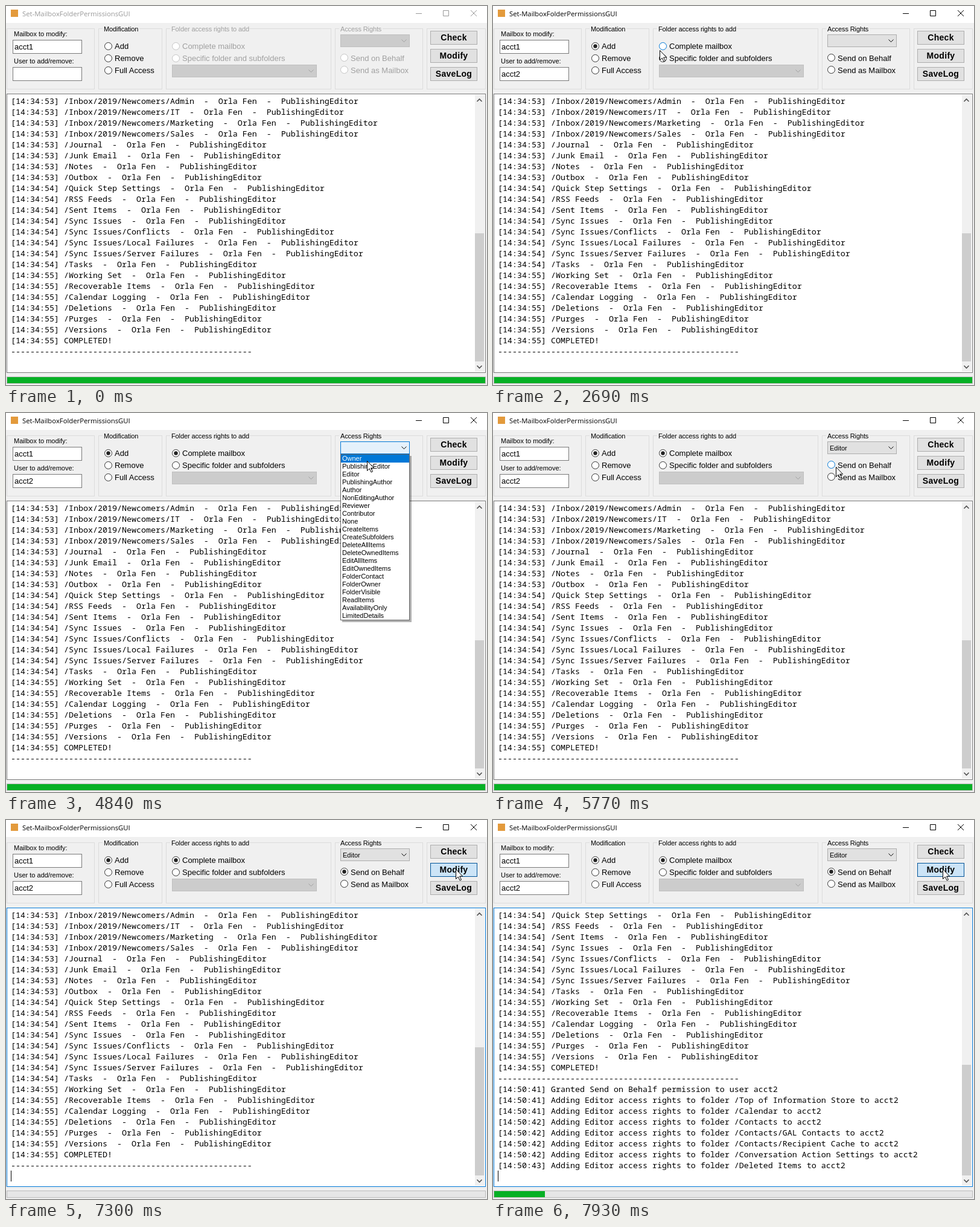
Write an HTML page that moves like this. It is 797 px wide and 627 px high and loops after 8000 ms.

```html
<!DOCTYPE html>
<html lang="en">
<head>
<meta charset="utf-8">
<title>Mailbox permissions</title>
<style>
html, body { margin: 0; width: 100%; height: 100%; overflow: hidden; background: #f0f0f0; }
svg { display: block; width: 797px; height: 627px; }
text { font: 13px "Liberation Sans", Arial, sans-serif; white-space: pre; fill: currentColor; }
.small { font-size: 11px; }
.head { font-size: 11px; letter-spacing: -.11px; }
.title { font: 11.3px "Open Sans", sans-serif; }
.bold { font-size: 14px; font-weight: bold; letter-spacing: .3px; }
.log text { font: 500 13.333px "Noto Sans Mono", monospace; }
.group { fill: none; stroke: #dcdcdc; }
.line { fill: none; stroke: currentColor; }
.box { fill: #fff; stroke: #7a7a7a; }
.box.hover { stroke: #171717; }
.box.focus { stroke: #0078d7; }
.button, .combo { fill: #e1e1e1; stroke: #adadad; }
.off { color: #a0a0a0; }
.off .combo { fill: #ccc; stroke: #bfbfbf; }
.ring { fill: #fff; stroke: #333; }
.off .ring { stroke: #c4c4c4; }
.hover .ring { stroke: #0078d7; }
.combo.hover, .button.hover { fill: #e5f1fb; stroke: #0078d7; }
.button.down { fill: #cce4f7; stroke: #005499; }
</style>
</head>
<body>
<svg id="stage" viewBox="0 0 797 627"></svg>
<script>
const STEP = 77, LOOP = 8000;
const stage = document.getElementById('stage');
const USER = 'acct2', PERSON = 'Orla Fen';

const rect = (x, y, w, h, attrs) => `<rect x="${x}" y="${y}" width="${w}" height="${h}" ${attrs}/>`;
const frame = (x, y, w, h, attrs) => rect(x + .5, y + .5, w - 1, h - 1, attrs);
const text = (x, y, str, attrs = '') => `<text x="${x}" y="${y}" xml:space="preserve" ${attrs}>${str}</text>`;
const path = (d, attrs) => `<path d="${d}" ${attrs}/>`;
const chevron = (x, y, dir = 1) => path(`M${x - 4} ${y - 2 * dir}l4 ${4 * dir}l4 ${-4 * dir}`, 'class="line"');

const radio = (id, x, y, label, baseline = y + 4.5) => `<g id="${id}">
  <circle class="ring" cx="${x}" cy="${y}" r="6"/>
  <circle id="${id}Dot" cx="${x}" cy="${y}" r="3.2" fill="#222" visibility="hidden"/>
  ${text(x + 10.5, baseline, label)}</g>`;

const group = (x, w, title = '', gap = 0) => frame(x, 37, w, 101, 'class="group"') +
  (title && rect(x + 7, 36, gap, 3, 'fill="#f0f0f0"') + text(x + 9, 42, title, 'class="head"'));

const button = (id, y, label) => frame(703, y, 78, 23, `id="${id}" class="button"`) +
  text(742, y + 16, label, 'class="bold" text-anchor="middle"');

// Log contents
const stamp = (time, str) => `[${time}] ${str}`;
const granted = (time, names) => names.map(n => stamp(time, `/${n}  -  ${PERSON}  -  PublishingEditor`));
const adding = (time, names) => names.map(n => stamp(time, `Adding Editor access rights to folder /${n} to ${USER}`));
const log = [
  ...granted('14:34:53', ['Inbox/2019/Newcomers/Admin', 'Inbox/2019/Newcomers/IT', 'Inbox/2019/Newcomers/Marketing',
    'Inbox/2019/Newcomers/Sales', 'Journal', 'Junk Email', 'Notes', 'Outbox']),
  ...granted('14:34:54', ['Quick Step Settings', 'RSS Feeds', 'Sent Items', 'Sync Issues', 'Sync Issues/Conflicts',
    'Sync Issues/Local Failures', 'Sync Issues/Server Failures', 'Tasks']),
  ...granted('14:34:55', ['Working Set', 'Recoverable Items', 'Calendar Logging', 'Deletions', 'Purges', 'Versions']),
  stamp('14:34:55', 'COMPLETED!'),
  '-'.repeat(50),
  stamp('14:50:41', `Granted Send on Behalf permission to user ${USER}`),
  ...adding('14:50:41', ['Top of Information Store', 'Calendar']),
  ...adding('14:50:42', ['Contacts', 'Contacts/GAL Contacts', 'Contacts/Recipient Cache', 'Conversation Action Settings']),
  ...adding('14:50:43', ['Deleted Items'])
];
const ROWS = 24;

const rights = ['Owner', 'PublishingEditor', 'Editor', 'PublishingAuthor', 'Author', 'NonEditingAuthor', 'Reviewer',
  'Contributor', 'None', 'CreateItems', 'CreateSubfolders', 'DeleteAllItems', 'DeleteOwnedItems', 'EditAllItems',
  'EditOwnedItems', 'FolderContact', 'FolderOwner', 'FolderVisible', 'ReadItems', 'AvailabilityOnly', 'LimitedDetails'];

stage.innerHTML = `
  ${rect(0, 0, 797, 627, 'fill="#f0f0f0"')}
  ${rect(0, 0, 797, 28, 'fill="#fff"')}
  ${rect(8, 6, 12, 12, 'fill="#e39a3c"')}
  <g id="caption">
    ${text(27, 17, 'Set-MailboxFolderPermissionsGUI', 'class="title"')}
    ${path('M679 12.5h10M724.5 7.5h9v9h-9zM770 7l10 10M780 7l-10 10', 'class="line"')}
  </g>
  ${group(1, 146)}
  ${text(13, 50, 'Mailbox to modify:', 'class="small"')}
  ${frame(11, 56, 115, 23, 'class="box"')}
  ${text(14, 72, 'acct1')}
  ${text(13, 95, 'User to add/remove:', 'class="small"')}
  ${frame(11, 101, 115, 23, 'id="field" class="box"')}
  ${text(14, 117, '', 'id="typed"')}
  ${rect(14, 105, 1, 15, 'id="caret"')}
  ${group(153, 106, 'Modification', 61)}
  ${radio('add', 169.5, 66.5, 'Add')}
  ${radio('remove', 169.5, 86.5, 'Remove')}
  ${radio('full', 169.5, 106.5, 'Full Access')}
  <g id="folders">
    ${group(265, 274, 'Folder access rights to add', 131)}
    ${radio('complete', 281.5, 66.5, 'Complete mailbox')}
    ${radio('specific', 281.5, 86.5, 'Specific folder and subfolders')}
    <g class="off">${frame(275, 97, 240, 21, 'class="combo"')}${chevron(505.5, 107.5)}</g>
  </g>
  <g id="access">
    ${group(545, 146, 'Access Rights', 72)}
    ${frame(554, 47, 115, 21, 'id="combo" class="combo"')}
    ${text(558, 62, 'Editor', 'id="chosen" class="small"')}
    ${chevron(659.5, 57.5)}
    ${radio('behalf', 560.5, 85.5, 'Send on Behalf', 91)}
    ${radio('asMailbox', 560.5, 105.5, 'Send as Mailbox', 111)}
  </g>
  ${group(697, 98)}
  ${button('check', 41, 'Check')}
  ${button('modify', 71, 'Modify')}
  ${button('save', 101, 'SaveLog')}
  ${frame(1, 145, 794, 462, 'id="logBox" class="box"')}
  ${rect(777, 147, 16, 458, 'fill="#f0f0f0"')}
  <g color="#505050" stroke-width="1.6">${chevron(784.5, 156, -1)}${chevron(784.5, 597)}</g>
  ${rect(777, 376, 15, 212, 'id="thumb" fill="#cdcdcd"')}
  <g class="log" id="rows">${Array.from({ length: ROWS }, (_, i) => text(8, 162 + 18 * i, '')).join('')}</g>
  ${rect(8, 580, 1, 18, 'id="logCaret"')}
  ${frame(1, 613, 794, 12, 'fill="#e6e6e6" stroke="#bcbcbc"')}
  ${rect(2, 614, 792, 10, 'id="progress" fill="#06b025"')}
  <g id="list">
    ${rect(557, 71, 115, 275, 'fill="#000" opacity=".3"')}
    ${frame(554, 68, 115, 275, 'fill="#fff" stroke="#646464"')}
    ${rect(555, 69, 113, 13, 'id="mark" fill="#0078d7"')}
    ${rights.map((r, i) => text(557, 79 + 13 * i, r, 'class="small"')).join('')}
  </g>
  <g id="cursor">
    ${path('M.5 .5v16l3.7-3.5 2.9 6 2.4-1.1-2.9-5.8h5z', 'id="arrow" fill="#fff" stroke="#000"')}
    ${path('M-3 -8.5h2.5l.5 .5l.5-.5h2.5M0 -8v16M-3 8.5h2.5l.5-.5l.5 .5h2.5', 'id="beam" class="line"')}
  </g>`;

const el = {};
stage.querySelectorAll('[id]').forEach(n => el[n.id] = n);
const rows = [...el.rows.children];
const items = [...el.list.querySelectorAll('text')];
const show = (node, on) => node.setAttribute('visibility', on ? 'visible' : 'hidden');
const within = (n, a, b) => n >= a && n < b;

// Pointer route: step, x, y
const route = [
  [2, 330, 500], [6, 210, 330], [11, 96, 145], [14, 62, 113], [23, 62, 113], [25, 84, 126], [28, 176, 70],
  [30, 176, 70], [33, 262, 78], [36, 283, 70], [41, 283, 70], [44, 428, 88], [48, 630, 95], [53, 566, 81],
  [55, 566, 81], [58, 606, 58], [61, 606, 58], [65, 590, 99], [70, 590, 99], [75, 568, 89], [77, 562, 85],
  [81, 562, 86], [87, 745, 81], [104, 745, 81]
];

function pointerAt(n) {
  const i = Math.max(1, route.findIndex(p => p[0] >= n));
  const [a, x0, y0] = route[i - 1], [b, x1, y1] = route[i];
  const k = Math.min(1, Math.max(0, (n - a) / (b - a)));
  return [Math.round(x0 + (x1 - x0) * k), Math.round(y0 + (y1 - y0) * k)];
}

function render(t) {
  const n = Math.floor(t / STEP + .25);
  const [x, y] = pointerAt(n);

  el.caption.setAttribute('color', n >= 14 ? '#000' : '#999');

  const letters = [16, 17, 18, 20, 21].filter(s => n >= s).length;
  const typing = within(n, 14, 29);
  el.typed.textContent = USER.slice(0, letters);
  el.caret.setAttribute('x', Math.round(15 + el.typed.getComputedTextLength()));
  show(el.caret, typing);
  el.field.classList.toggle('focus', typing);

  el.folders.classList.toggle('off', n < 29);
  el.access.classList.toggle('off', n < 29);
  show(el.addDot, n >= 29);
  show(el.completeDot, n >= 38);
  show(el.behalfDot, n >= 80);
  show(el.chosen, n >= 70);
  el.add.classList.toggle('hover', within(n, 28, 31));
  el.complete.classList.toggle('hover', within(n, 35, 45));
  el.behalf.classList.toggle('hover', within(n, 51, 57) || within(n, 73, 83));

  const open = within(n, 60, 70);
  show(el.list, open);
  el.combo.classList.toggle('hover', within(n, 57, 70));
  const picked = y < 69 ? -1 : Math.floor((y - 69) / 13);
  el.mark.setAttribute('y', 69 + 13 * picked);
  show(el.mark, open && picked >= 0);
  items.forEach((item, i) => item.style.fill = i === picked ? '#fff' : '#000');

  const running = n >= 90;
  el.modify.classList.toggle('hover', within(n, 86, 90));
  el.modify.classList.toggle('down', running);
  el.logBox.classList.toggle('hover', within(n, 2, 11));
  el.logBox.classList.toggle('focus', running);
  show(el.logCaret, running);

  const added = Math.min(8, Math.max(0, n - 95));
  rows.forEach((row, i) => row.textContent = log[i + added]);
  const top = Math.round(588.4 - 10625 / (50 + added));
  el.thumb.setAttribute('y', top);
  el.thumb.setAttribute('height', 588 - top);
  el.progress.setAttribute('width', running ? Math.max(0, 17 * added - 52) : 792);

  const beam = n < 26;
  show(el.arrow, !beam);
  show(el.beam, beam && (within(n, 2, 16) || n >= 23));
  el.cursor.setAttribute('transform', `translate(${x} ${y})`);
}

const start = performance.now();
function tick() {
  render((performance.now() - start) % LOOP);
  requestAnimationFrame(tick);
}
tick();
</script>
</body>
</html>
```
